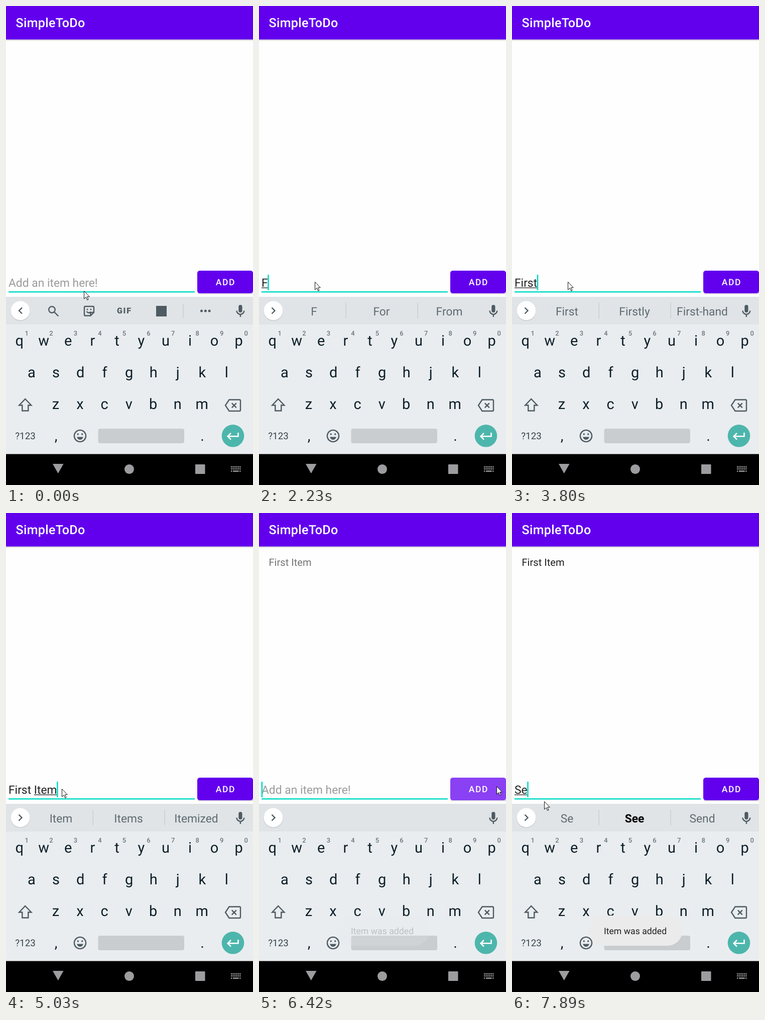
An HTML page for the animation above (8000 ms loop, 492 by 952 pixels).

```html
<!DOCTYPE html>
<html lang="en">
<head>
<meta charset="utf-8">
<title>SimpleToDo</title>
<style>
html, body { margin: 0; width: 100%; height: 100%; overflow: hidden; background: #fefefe; }
svg { display: block; width: 492px; height: 952px; font-family: Roboto, sans-serif; text-rendering: geometricPrecision; }
text { white-space: pre; }
.mid { text-anchor: middle; }
.medium { font-weight: 500; }
.field { font-size: 22.8px; }
.icon { fill: none; stroke: #4f5b62; stroke-width: 2.4; }
.solid { fill: #4f5b62; }
.rule { fill: #c5cacd; }
.key { font-size: 29px; fill: #0d1e27; }
.hint { font-size: 13px; font-weight: 500; fill: #6b767c; }
.nav { fill: #9d9da0; }
</style>
</head>
<body>
<svg viewBox="0 0 492 952">
  <defs>
    <linearGradient id="shade" x2="0" y2="1">
      <stop stop-color="#000" stop-opacity=".24"/>
      <stop offset="1" stop-color="#000" stop-opacity="0"/>
    </linearGradient>
    <clipPath id="buttonClip"><rect x="381" y="526" width="111" height="45" rx="5"/></clipPath>
  </defs>

  <rect width="492" height="952" fill="#fefefe"/>
  <rect y="66" width="492" height="4" fill="url(#shade)"/>
  <rect width="492" height="66.5" fill="#6200ee"/>
  <text class="medium" x="19.5" y="42" font-size="25.1" letter-spacing=".3" fill="#fff">SimpleToDo</text>
  <text id="item" x="19.5" y="104.5" font-size="20.1" fill="#212121">First Item</text>

  <!-- input row -->
  <text id="placeholder" class="field" x="5" y="558" fill="#9b9b9b">Add an item here!</text>
  <text id="typed" class="field" x="5" y="558" fill="#212121"></text>
  <rect id="underline" y="559.5" height="1.3" fill="#212121"/>
  <rect id="caret" y="534" width="2.6" height="31" fill="#03dac5"/>
  <rect x="5" y="567" width="371" height="2.5" fill="#03dac5"/>
  <rect x="382" y="569" width="110" height="5" fill="url(#shade)"/>
  <rect x="381" y="526" width="111" height="45" rx="5" fill="#6200ee"/>
  <g clip-path="url(#buttonClip)"><circle id="ripple" cx="473" cy="548" fill="#fff"/></g>
  <text class="medium" x="417.7" y="555" font-size="17.5" letter-spacing="1.56" fill="#fff">ADD</text>

  <!-- keyboard -->
  <rect y="578" width="492" height="312.5" fill="#e9edf0"/>
  <rect y="578" width="492" height="55" fill="#e0e4e7"/>
  <circle cx="28.5" cy="606.5" r="19.3" fill="#000" opacity=".14"/>
  <circle cx="28.5" cy="605.5" r="19" fill="#fff"/>
  <path id="chevron" class="icon"/>
  <g id="tools">
    <circle class="icon" cx="91.5" cy="603.5" r="6.3"/>
    <path class="icon" d="M96 608l8.3 8.3"/>
    <path class="icon" stroke-width="2" d="M158 597h15q2 0 2 2v10l-6.500 6.500h-10.500q-2 0-2-2v-14.500q0-2 2-2zM175 609h-4.500q-2 0-2 2v4.500M160.500 607q4 5 8.500 1"/>
    <circle class="solid" cx="162" cy="603" r="1.5"/><circle class="solid" cx="169" cy="603" r="1.5"/>
    <text class="solid" x="221" y="611" font-size="16" font-weight="900" letter-spacing="1.7">GIF</text>
    <rect class="solid" x="299" y="596" width="21" height="21"/>
    <rect class="rule" x="352.500" y="592" width="1.300" height="28"/>
    <g class="solid"><circle cx="389.500" cy="606" r="2.500"/><circle cx="397.300" cy="606" r="2.500"/><circle cx="405.100" cy="606" r="2.500"/></g>
  </g>
  <g id="words" class="field mid">
    <text x="109.500" y="615"></text><text x="244" y="615"></text><text x="379" y="615"></text>
    <rect class="rule" x="172.500" y="590" width="1.300" height="31"/>
    <rect class="rule" x="315.500" y="590" width="1.300" height="31"/>
  </g>
  <rect class="solid" x="463.300" y="594" width="7.200" height="15" rx="3.600"/>
  <path class="icon" stroke-width="2" d="M459.500 605.500a7.400 7.400 0 0 0 14.800 0M466.900 613v5"/>

  <g id="keys" class="mid"></g>
  <path class="icon" d="M38.300 781l12 12.500h-6v11h-12v-11h-6z"/>
  <path class="icon" d="M444.500 782.500h20.500q2 0 2 2v18.500q0 2-2 2h-20.500l-7.500-11.250zM449.800 789.300l9 9m0-9l-9 9"/>
  <text class="mid" x="38.500" y="861" font-size="18.800" fill="#37444b">?123</text>
  <circle class="icon" cx="147.500" cy="854.500" r="11.600"/>
  <circle class="solid" cx="143.300" cy="851" r="1.800"/><circle class="solid" cx="151.700" cy="851" r="1.800"/>
  <path class="solid" d="M141 856.500h13q-2 5.500-6.500 5.500t-6.500-5.500z"/>
  <rect x="183.500" y="840" width="171.500" height="29" rx="4" fill="#c9cdd0"/>
  <circle cx="452" cy="854.300" r="22.300" fill="#4db6ac"/>
  <path fill="none" stroke="#fff" stroke-width="2.600" d="M462.500 848v7.300h-20.500M448 849l-6.300 6.300 6.300 6.300"/>

  <!-- navigation bar -->
  <rect y="890.500" width="492" height="61.500"/>
  <path class="nav" d="M93 910h21.500l-10.750 19z"/>
  <circle class="nav" cx="245.500" cy="920.500" r="9.500"/>
  <rect class="nav" x="377" y="911" width="19.500" height="19" rx="1"/>
  <path fill="none" stroke="#9d9da0" stroke-width="2.300" stroke-dasharray="2.300 1.140" d="M448 916h19.500M448 920h19.500"/>
  <path fill="none" stroke="#9d9da0" stroke-width="2.300" d="M448 924.500h2.300M452 924.500h11.700M465.200 924.500h2.300"/>

  <g id="toast">
    <rect x="152.500" y="800" width="187" height="60" rx="30" fill="#ebebeb"/>
    <text class="mid" x="245.500" y="836.500" font-size="17.700" fill="#212121">Item was added</text>
  </g>
  <path id="pointer" d="M.5.500v15.500l3.700-3.400 2.500 5.700 2.300-1-2.500-5.500h4.800z" fill="#fff" stroke="#111" stroke-width="1"/>
</svg>
<script>
const LOOP = 8000;
const $ = id => document.getElementById(id);
const show = (el, on) => el.setAttribute('visibility', on ? 'visible' : 'hidden');
const set = (el, attrs) => { for (const k in attrs) el.setAttribute(k, attrs[k]); };

// Every track holds its value until the next entry: [time, ...values]
const pointerTrack = [
  [0, 155, 566], [800, 156, 453], [920, 155, 457], [1070, 109, 537], [1220, 93, 555],
  [1490, 103, 552], [1610, 111, 548], [5640, 180, 548], [5760, 300, 548], [5910, 420, 546],
  [6030, 473, 543], [6690, 330, 556], [6810, 120, 570], [6930, 64, 573]
];
const caretTrack = [
  [0, 0], [370, 1], [920, 0], [1370, 1], [1770, 0], [2230, 1],
  [5490, 0], [6030, 1], [6930, 0], [7330, 1]
];
// text, finished characters before the underlined word, suggestions (* is bold)
const typingTrack = [
  [0, '', 0, null],
  [2230, 'F', 0, 'F|For|From'],
  [2380, 'Fi', 0, 'Fi|Find|Fire'],
  [2500, 'Fir', 0, 'Fir|*For|Fire'],
  [2780, 'Firt', 0, 'Firt|*First|Fit'],
  [3190, 'Fir', 0, 'Firt|*First|Fit'],
  [3340, 'Firs', 0, 'Firs|*First|Firstly'],
  [3800, 'First', 0, 'First|Firstly|First-hand'],
  [3950, 'First ', 6, 'day|of|time'],
  [4230, 'First I', 6, 'I|In|It'],
  [4790, 'First It', 6, 'It|Its|Item'],
  [4910, 'First Ite', 6, 'Ite|*Item|Items'],
  [5030, 'First Item', 6, 'Item|Items|Itemized'],
  [6420, '', 0, ''],
  [7610, 'S', 0, 'S|So|Say'],
  [7890, 'Se', 0, 'Se|*See|Send']
];
const rippleTrack = [[0, 0, 0], [6150, 19, .25], [6300, 58, .25], [6420, 110, .25], [6540, 110, .16], [6690, 110, .05], [6810, 0, 0]];
const toastTrack = [[0, 0], [6420, .22], [6540, .75], [6690, 1]];
const itemTrack = [[0, 0], [6420, .62], [6540, 1]];

const at = (track, t) => track.findLast(step => step[0] <= t).slice(1);

function addKeys(chars, x, y, cls) {
  [...chars].forEach((c, i) => {
    const key = document.createElementNS('http://www.w3.org/2000/svg', 'text');
    set(key, { class: cls, x: x + 48.55 * i, y });
    key.textContent = c;
    $('keys').append(key);
  });
}
addKeys('qwertyuiop', 26.7, 675, 'key');
addKeys('1234567890', 41.3, 655, 'hint');
addKeys('asdfghjkl', 51, 738, 'key');
addKeys('zxcvbnm', 99, 801, 'key');
addKeys(',', 99.5, 864, 'key');
addKeys('.', 391, 864, 'key');

const typed = $('typed');
const labels = [...$('words').querySelectorAll('text')];
let current;

function setTyping(step) {
  const [text, done, hints] = step;
  typed.textContent = text;
  show($('placeholder'), !text);
  const width = text ? typed.getComputedTextLength() : 0;
  const start = done ? typed.getSubStringLength(0, done) : 0;
  set($('underline'), { x: 5 + start, width: Math.max(0, width - start) });
  set($('caret'), { x: 4.6 + width });

  const tools = hints === null;
  show($('tools'), tools);
  show($('words'), hints);
  $('chevron').setAttribute('d', tools ? 'M32 599.500l-6 6 6 6' : 'M25.500 599.500l6 6-6 6');
  (hints || '||').split('|').forEach((word, i) => {
    const bold = word[0] === '*';
    labels[i].textContent = bold ? word.slice(1) : word;
    set(labels[i], { 'font-weight': bold ? 700 : 400, fill: bold ? '#000' : '#5f6b71' });
  });
}

function draw(now) {
  const t = now % LOOP;
  const step = at(typingTrack, t);
  const id = step.join();
  if (id !== current) {
    setTyping(step);
    current = id;
  }
  const [x, y] = at(pointerTrack, t);
  const [r, opacity] = at(rippleTrack, t);
  set($('pointer'), { transform: `translate(${x} ${y})` });
  set($('ripple'), { r, opacity });
  show($('caret'), at(caretTrack, t)[0]);
  set($('toast'), { opacity: at(toastTrack, t)[0] });
  set($('item'), { opacity: at(itemTrack, t)[0] });
}

const begin = performance.now();
function frame() {
  draw(performance.now() - begin);
  requestAnimationFrame(frame);
}
frame();
</script>
</body>
</html>
```
